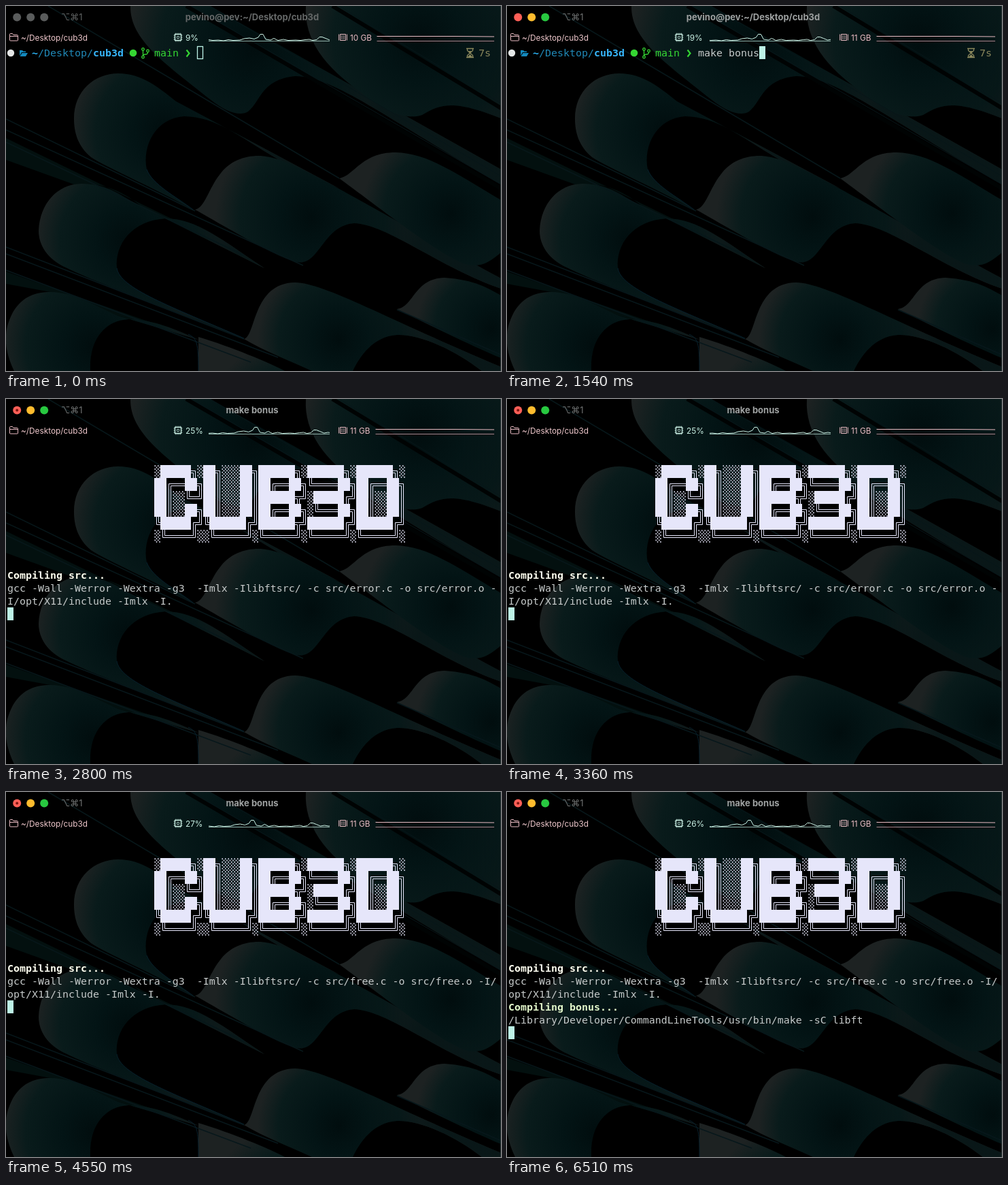
An HTML page with a canvas that plays this animation: 728 by 536 pixels, repeating every 6.58 s.

```html
<!DOCTYPE html>
<html lang="en">
<head>
<meta charset="utf-8">
<title>Terminal build</title>
<style>
  html, body { margin: 0; width: 100%; height: 100%; overflow: hidden; background: #000; }
  canvas { display: block; }
</style>
</head>
<body>
<canvas id="stage" width="728" height="536"></canvas>
<script>
const W = 728, H = 536, LOOP = 6580, TICK = 70;
const COL = 9, ROW = 19, LEFT = 2, TOP = 59;
const MONO = '14.95px "DejaVu Sans Mono", monospace';
const BOLD = 'bold ' + MONO;
const BAR = '11.8px Inter, sans-serif';
const TITLE = 'bold 13px Inter, sans-serif';
const MINT = '#cdf3e7', PINK = '#eabcc3', CURSOR = '#bdf2e6';
const LAVENDER = '#e6e6fa', GREEN = '#35d633', TEXT = '#c6caca';

const ctx = document.getElementById('stage').getContext('2d');

const LOGO = [
  '░█████╗░██╗░░░██╗██████╗░██████╗░██████╗░',
  '██╔══██╗██║░░░██║██╔══██╗╚════██╗██╔══██╗',
  '██║░░╚═╝██║░░░██║██████╦╝░█████╔╝██║░░██║',
  '██║░░██╗██║░░░██║██╔══██╗░╚═══██╗██║░░██║',
  '╚█████╔╝╚██████╔╝██████╦╝██████╔╝██████╔╝',
  '░╚════╝░░╚═════╝░╚═════╝░╚═════╝░╚═════╝░'
];

// Latest value whose start time has been reached.
const at = (steps, t) => steps.filter(s => s[0] <= t).pop()[1];
const CPU = [[0, 9], [700, 19], [1750, 17], [2730, 25], [3710, 27], [5740, 26]];
const FILES = [[0, 'colors'], [2800, 'error'], [3570, 'init'], [4200, 'free']];
const FOCUS = 280, TYPE = 630, RUN = 2100, BONUS = 4620;

function layer(draw) {
  const c = document.createElement('canvas');
  c.width = W;
  c.height = H;
  draw(c.getContext('2d'));
  return c;
}

function text(str, x, y, color, font) {
  ctx.font = font;
  ctx.fillStyle = color;
  ctx.fillText(str, x, y);
}

const cell = (str, col, row, color, font = MONO) =>
  text(str, LEFT + col * COL, TOP + row * ROW + 15, color, font);

function dot(x, y, r, color) {
  ctx.fillStyle = color;
  ctx.beginPath();
  ctx.arc(x, y, r, 0, 7);
  ctx.fill();
}

function line(d, color, width = 1) {
  ctx.strokeStyle = color;
  ctx.lineWidth = width;
  ctx.stroke(new Path2D(d));
}

function shape(d, color) {
  ctx.fillStyle = color;
  ctx.fill(new Path2D(d));
}

const wallpaper = layer(g => {
  g.fillRect(0, 0, W, H);

  // Grey rim around a dark core, with the tail fading down to the right.
  function fold(d, x, y, r) {
    const path = new Path2D(d);
    const rim = g.createRadialGradient(x, y, 0, x, y, r);
    rim.addColorStop(0, '#010d0e');
    rim.addColorStop(0.35, '#031415');
    rim.addColorStop(0.75, '#091b1b');
    rim.addColorStop(1, '#1d2222');
    g.fillStyle = rim;
    g.fill(path);
    const fade = g.createLinearGradient(x, y, x + r, y + r / 2);
    fade.addColorStop(0, 'rgba(4,20,21,0)');
    fade.addColorStop(1, 'rgba(4,20,21,.8)');
    g.fillStyle = fade;
    g.fill(path);
  }

  function streak(d, color, width) {
    g.strokeStyle = color;
    g.lineWidth = width;
    g.stroke(new Path2D(d));
  }

  // Dim bands behind the left edge.
  g.fillStyle = '#03100f';
  g.fill(new Path2D('M0 194L350 364L200 295C170 270 140 258 100 262L0 226ZM0 390L280 488L165 455L65 420L0 408Z'));

  fold('M183 0C182 50 235 85 300 137C325 157 345 162 356 155C375 140 375 108 425 103C480 102 560 165 728 262L728 240L300 0Z', 365, 60, 185);
  fold('M441 0C438 50 470 90 520 125C555 155 590 168 612 160C640 143 660 138 728 165L728 0Z', 610, 50, 172);
  fold('M165 99C200 99 225 120 250 140L490 268L400 225C340 190 310 163 262 162C220 165 200 205 207 240C215 262 250 280 275 299C220 268 150 238 125 222C105 205 100 185 100 165C100 125 130 99 165 99Z', 235, 185, 138);
  fold('M278 299C292 297 298 268 314 248C328 228 350 220 372 220C420 222 470 260 728 400L728 415C640 385 560 320 512 319C470 322 462 372 437 376C420 382 340 334 278 299Z', 450, 310, 142);
  fold('M490 253C512 250 522 215 573 215C620 216 660 245 728 285L728 362C715 372 705 381 688 381C660 384 560 304 490 253Z', 655, 305, 132);
  fold('M110 261C150 260 170 280 200 295L380 385C320 345 280 312 235 312C185 315 160 350 163 385C168 415 240 440 350 488C250 450 130 405 90 385C60 372 48 350 48 330C50 290 75 262 110 261Z', 180, 345, 135);
  fold('M350 489C368 485 362 407 425 406C470 407 560 460 728 530L728 536L700 536C660 505 610 482 575 483C540 485 520 515 510 536L450 536C420 522 380 507 350 489Z', 490, 490, 120);
  fold('M575 445C600 442 600 400 645 399C690 402 710 415 728 425L728 517C680 497 620 467 575 445Z', 715, 475, 112);
  fold('M65 420C100 420 130 440 165 455L283 490C250 475 215 460 180 460C145 462 122 490 124 536L12 536C-5 500 -3 475 10 450C25 425 45 420 65 420Z', 130, 500, 135);
  fold('M283 486C330 500 390 525 410 536L283 536Z', 430, 640, 150);

  streak('M265 0L728 268M480 0L728 150', '#000303', 6);
  streak('M272 0L728 262M300 0L728 250M490 0L728 143', '#071619', 1);
  streak('M0 166L278 301M0 182L437 381M0 200L350 366M62 0L490 253', '#07171a', 1.5);
  streak('M0 354L350 489M0 388L360 523M0 364L400 516M575 446L728 512', '#07171b', 1.5);
  streak('M207 240C215 262 250 280 275 299M163 385C168 415 240 440 350 488M268 482C281 488 283 495 283 536', '#07202c', 1);
  streak('M727.5 0V536', '#2c3638', 1);
});

const banner = layer(g => {
  const CORNERS = {
    '╗': [[-1, 1]], '╔': [[1, 1]], '╝': [[-1, -1]], '╚': [[1, -1]], '╦': [[-1, 1], [1, 1]]
  };
  const GAPS = [-1.5, 1.5];
  g.fillStyle = g.strokeStyle = LAVENDER;

  function shade(x, y) {
    for (let j = 0; j < 8; j++)
      for (let i = 0; i < 2; i++)
        g.fillRect(x + 0.5 + i * 4.5 + (j % 2) * 2.25, y + 0.3 + j * 2.375, 1.5, 1.8);
  }

  function glyph(ch, x, y) {
    const cx = x + 5, cy = y + 10;
    const across = gap => { g.moveTo(x, cy + gap); g.lineTo(x + COL, cy + gap); };
    const down = gap => { g.moveTo(cx + gap, y); g.lineTo(cx + gap, y + ROW); };

    if (ch === '█') return g.fillRect(x, y, COL, ROW);
    if (ch === '░') return shade(x, y);
    g.beginPath();
    if (ch === '═') GAPS.forEach(across);
    if (ch === '║') GAPS.forEach(down);
    if (ch === '╦') across(-1.5);
    for (const [dx, dy] of CORNERS[ch] || [])
      for (const gap of ch === '╦' ? [1.5] : GAPS) {
        g.moveTo(dx > 0 ? x + COL : x, cy + dy * gap);
        g.lineTo(cx + dx * gap, cy + dy * gap);
        g.lineTo(cx + dx * gap, dy > 0 ? y + ROW : y);
      }
    g.stroke();
  }

  LOGO.forEach((row, r) => [...row].forEach((ch, c) =>
    glyph(ch, LEFT + (24 + c) * COL, TOP + (2 + r) * ROW)));
});

function titleBar(t) {
  const active = t >= FOCUS;
  ['#ff5f57', '#febc2e', '#28c840'].forEach((color, i) =>
    dot(16.2 + i * 20, 16.5, 6, active ? color : '#5a5c5c'));
  if (t >= RUN) dot(16.2, 16.5, 2, '#7d1712');
  text('⌥⌘1', 81, 21, active ? '#6f7272' : '#5f6262', '13px Inter, "DejaVu Sans", sans-serif');
  ctx.textAlign = 'center';
  text(t < RUN ? 'pevino@pev:~/Desktop/cub3d' : 'make bonus', 362, 21, active ? '#9ea1a1' : '#656868', TITLE);
  ctx.textAlign = 'left';
}

function cpuGraph(t) {
  const shift = t * 0.003;
  ctx.save();
  ctx.beginPath();
  ctx.rect(298, 39, 178, 14);
  ctx.clip();
  line('M298 51.5H476', '#8fb0a8');
  ctx.translate(-shift, 0);
  line('M298 49.5L304 50.5L312 50L320 51L327 49.5L334 50.5L344 50L350 48L358 47L365 48.5L371 46' +
    'L374 41.5L378 41.5L382 49L389 50L394 47.5L400 50.5L408 49L415 50.5L426 50L433 50.5L440 49.5' +
    'L446 49L451 50.5L457 49.5L461 45.5L465 45.5L470 47.5L476 50L482 49L488 50L497 49.5', MINT);
  ctx.restore();
}

function statusBar(t) {
  line('M5.5 50V41.5Q5.5 40.5 6.5 40.5H9.5L11 42.5H16.5Q17.5 42.5 17.5 43.5V50Q17.5 51 16.5 51H6.5Q5.5 51 5.5 50M5.5 44.5H17.5', PINK);
  text('~/Desktop/cub3d', 22, 50.5, '#eec7cb', BAR);

  line('M248.5 41.5H257.5V50.5H248.5Z', MINT, 1.3);
  line('M251.5 44.5H254.5V47.5H251.5Z', MINT, 0.7);
  for (const p of [2, 5, 8])
    line(`M${248 + p} 39.5v2M${248 + p} 50.5v2M246.5 ${41 + p}h2M257.5 ${41 + p}h2`, MINT, 0.8);
  text(at(CPU, t) + '%', 264, 50.5, MINT, BAR);
  cpuGraph(t);

  line('M491.5 41.5H499.5V50.5H491.5Z', PINK);
  line('M494 43V49M497 43V49M489.5 41.5V50.5M501.5 41.5V50.5', PINK, 0.9);
  const more = t >= 700;
  const x = more ? 543.5 : 545.5;
  text(more ? '11 GB' : '10 GB', 506, 50.5, PINK, BAR);
  line(`M${x} 51.5H718`, '#a98088');
  line(`M${x} 44.5H660L718 45`, PINK);
}

function cursor(col, row, hollow) {
  const x = LEFT + col * COL, y = TOP + row * ROW;
  if (hollow) {
    ctx.strokeStyle = CURSOR;
    ctx.lineWidth = 1.3;
    ctx.strokeRect(x + 0.5, y + 0.5, COL - 1, ROW - 1);
  } else {
    ctx.fillStyle = CURSOR;
    ctx.fillRect(x, y, COL, ROW);
  }
}

function prompt(t) {
  dot(7, 69, 5.2, '#e4e6e6');
  shape('M20 73V65H24L25.5 66.5H29V68H23ZM23.5 69H32L29 74H20.5Z', '#1489bd');
  cell('~', 4, 0, '#2bb3f5', BOLD);
  cell('/Desktop/', 5, 0, '#2089b8');
  cell('cub3d', 14, 0, '#37b6fb', BOLD);
  dot(187, 69, 5.3, GREEN);
  line('M201.5 65V73M208.5 68Q208.5 71 205 71Q201.5 71 201.5 73', GREEN, 1.3);
  for (const [x, y] of [[201.5, 63.5], [201.5, 75], [208.5, 66]]) {
    ctx.beginPath();
    ctx.arc(x, y, 1.8, 0, 7);
    ctx.stroke();
  }
  cell('main', 24, 0, GREEN);
  line('M265.5 64.5L269.5 69.5L265.5 74.5', GREEN, 2.2);
  line('M677 62.5H688M677 75.5H688M678.5 63V65.5L686.5 72.5V75M686.5 63V65.5L678.5 72.5V75', '#8a875c', 1.3);
  shape('M680 66H685L682.5 68.5ZM679 75L682.5 71L686 75Z', '#8a875c');
  cell('7s', 77, 0, '#8a875c');

  const typed = 'make bonus'.slice(0, Math.max(0, Math.floor((t - TYPE) / TICK) + 1));
  cell(typed, 31, 0, TEXT);
  cursor(31 + typed.length, 0, t < FOCUS);
}

function build(t) {
  const file = 'src/' + at(FILES, t);
  const command = `gcc -Wall -Werror -Wextra -g3  -Imlx -Ilibftsrc/ -c ${file}.c -o ${file}.o -I/opt/X11/include -Imlx -I.`;
  ctx.drawImage(banner, 0, 0);
  cell('Compiling src...', 0, 10, '#fffff0', BOLD);
  cell(command.slice(0, 80), 0, 11, TEXT);
  cell(command.slice(80), 0, 12, TEXT);
  if (t < BONUS) return cursor(0, 13);
  cell('Compiling bonus...', 0, 13, '#e3f8cb', BOLD);
  cell('/Library/Developer/CommandLineTools/usr/bin/make -sC libft', 0, 14, TEXT);
  cursor(0, 15);
}

const start = performance.now();

function frame() {
  const t = Math.floor((performance.now() - start) % LOOP / TICK) * TICK;
  ctx.drawImage(wallpaper, 0, 0);
  titleBar(t);
  statusBar(t);
  (t < RUN ? prompt : build)(t);
  requestAnimationFrame(frame);
}

frame();
</script>
</body>
</html>
```
